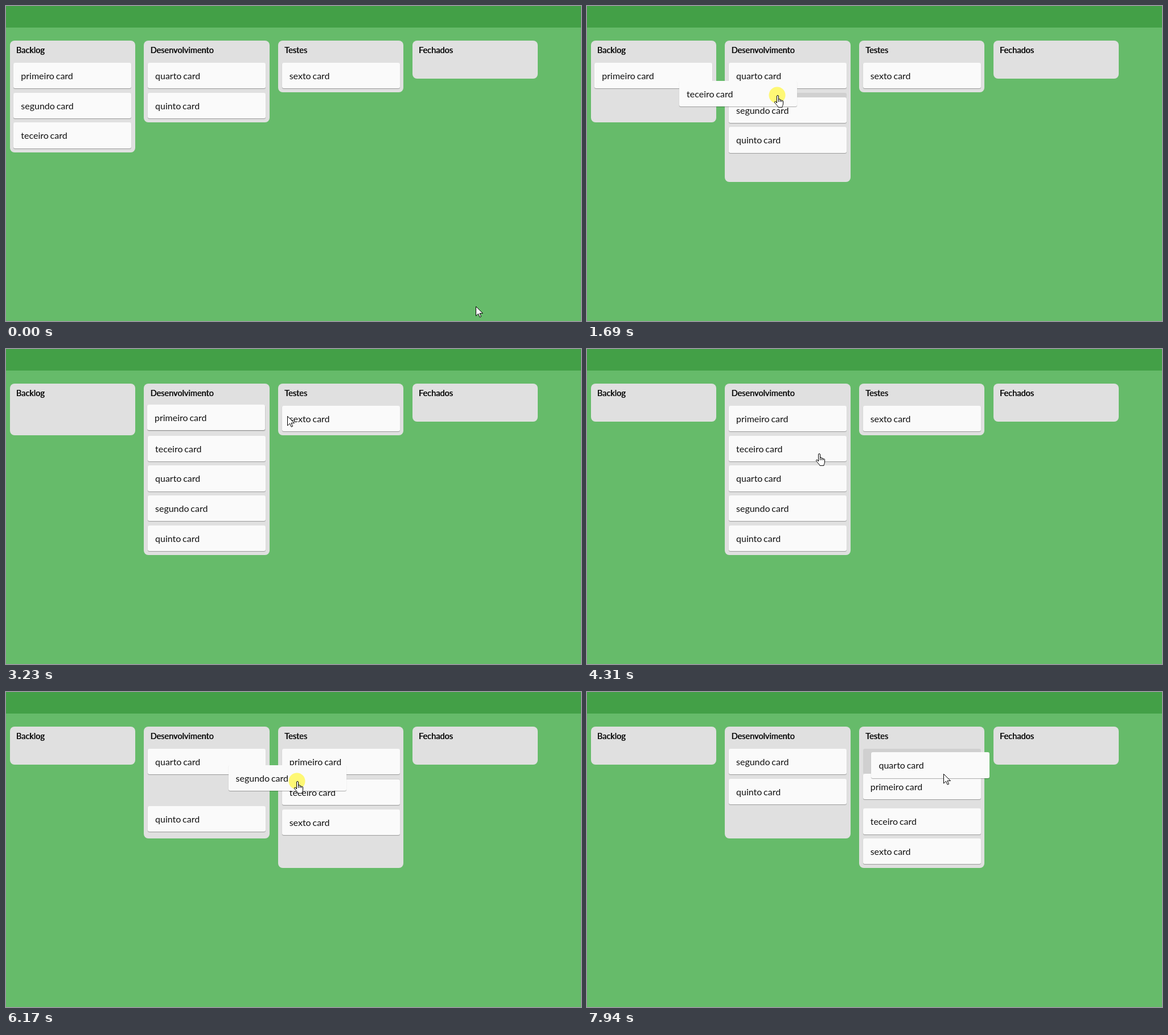
An HTML page that plays this animation: 1010x555 px, repeating every 8 s.

```html
<!DOCTYPE html>
<html lang="pt">
<head>
<meta charset="utf-8">
<title>Quadro kanban</title>
<style>
html, body { margin: 0; width: 100%; height: 100%; overflow: hidden; background: #66bb6a; }
body { position: relative; font-family: Lato, sans-serif; color: #111; }
header { height: 38px; background: #43a047; }
.column, .card, #slot, #cursor { position: absolute; box-sizing: border-box; }
.column {
  top: 61.4px; width: 220.3px; padding-left: 11px; border-radius: 8px; background: #e0e0e0;
  font-size: 14.5px; line-height: 33px; text-shadow: .6px 0 #111;
}
.card, #slot { width: 207.2px; height: 45.2px; border-radius: 3px; }
.card {
  padding-left: 13px; background: #fafafa; box-shadow: 0 1px 1px rgba(0, 0, 0, .32);
  font-size: 16px; line-height: 45px; word-spacing: -1.3px; z-index: 1;
}
#slot { background: #d0d0d0; }
#cursor { left: 0; top: 0; width: 100%; height: 100%; z-index: 3; }
#cursor path { fill: #fff; stroke: #000; stroke-linejoin: round; }
</style>
</head>
<body>
<header></header>
<svg id="cursor">
  <g id="pointer">
    <circle id="press" r="14.5" fill="rgb(255,246,60)" fill-opacity=".7"/>
    <path id="arrow" d="M.5.5V17l4-3.8 2.7 6 2.4-1-2.6-5.8h5.5z"/>
    <path id="hand" transform="translate(-6 0)" d="M5.5 14V2a1.5 1.5 0 0 1 3 0v6a1.4 1.2 0 0 1 2.8.3v1
      a1.4 1.2 0 0 1 2.7.4v.6a1.3 1.2 0 0 1 2.5.6v4c0 3-1.5 4-1.5 6.5H8c-1-2.5-4-5-6.3-8.2
      c-1-1.6 1-2.6 2.2-1.5zM8.5 8v4M11.3 9v3M14 10v2"/>
  </g>
</svg>
<script>
const LOOP = 8000, TICK = 1000 / 13, SLIDE = 230;
const COL_W = 220.3, CARD_W = 207.2, CARD_H = 45.2, PITCH = 52.7, TOP = 100;
const titles = ['Backlog', 'Desenvolvimento', 'Testes', 'Fechados'];
const board = [['primeiro', 'segundo', 'teceiro'], ['quarto', 'quinto'], ['sexto'], []];

// grip: pointer within the card; via and to: card positions on the way and at release
const drags = [
  { name: 'segundo', grab: 590, drop: 920, grip: [150, 25], to: [200, 128] },
  { name: 'teceiro', grab: 1320, drop: 1940, grip: [172, 25], via: [1692, 162, 132], to: [243, 84] },
  { name: 'primeiro', grab: 2500, drop: 3050, grip: [185, 26], via: [2769, 70, 100], to: [240, 80], rest: [3400, 590, 136] },
  { name: 'teceiro', grab: 4330, drop: 4740, grip: [158, 31], to: [500, 104] },
  { name: 'primeiro', grab: 5050, drop: 5640, grip: [89, 41], via: [5308, 467, 119], to: [507, 101] },
  { name: 'segundo', grab: 5960, drop: 6290, grip: [120, 28], to: [490, 112] },
  { name: 'segundo', grab: 6600, drop: 6940, grip: [112, 28], via: [6846, 256, 149], to: [249, 152] },
  { name: 'quarto', grab: 7280, drop: 7880, grip: [125, 37], via: [7570, 440, 123], to: [501, 107] }
];

const $ = id => document.getElementById(id);
const colX = col => 6.7 + 235.7 * col;
const slotX = col => colX(col) + 6.6;
const slotY = row => TOP + PITCH * row;
const mix = (a, b, p) => a + (b - a) * p;
const ease = u => { u = Math.min(1, Math.max(0, u)); return u * u * (3 - 2 * u); };
const slideY = (spot, t) => mix(spot.from, spot.to, ease((t - spot.time) / SLIDE));

const path = [[-40, 825, 529]];
function pointerAt(t) {
  const i = path.findIndex(p => p[0] > t);
  if (i < 0) return path.at(-1).slice(1);
  const [t0, x0, y0] = path[i - 1], [t1, x1, y1] = path[i];
  const p = (t - t0) / (t1 - t0);
  return [mix(x0, x1, p), mix(y0, y1, p)];
}

// Each card keeps the history of the spots it slides to
const tracks = {};
board.forEach((list, col) => list.forEach((name, row) =>
  tracks[name] = [{ time: -LOOP, col, row, from: slotY(row), to: slotY(row) }]));
const spotAt = (name, t) => tracks[name].findLast(s => s.time <= t);

function move(name, col, row, time) {
  board.forEach(list => list.includes(name) && list.splice(list.indexOf(name), 1));
  if (col < 0) tracks[name].push({ time, col, row, from: TOP, to: TOP });
  else board[col].splice(row, 0, name);
  board.forEach((list, c) => list.forEach((other, r) => {
    const last = tracks[other].at(-1), to = slotY(r);
    if (other === name) tracks[other].push({ time, col: c, row: r, from: to, to });
    else if (to !== last.to) tracks[other].push({ time, col: c, row: r, from: slideY(last, time), to });
  }));
}

// A dragged card takes the column under its centre and the row under the pointer
function carry(d, t) {
  const [x, y] = pointerAt(t), now = tracks[d.name].at(-1);
  const centre = x - d.grip[0] + CARD_W / 2;
  const col = titles.findIndex((_, i) => centre >= colX(i) && centre < colX(i) + COL_W);
  const room = col < 0 ? 0 : board[col].filter(name => name !== d.name).length;
  const row = Math.min(room, Math.floor((y - TOP + 2) / PITCH));
  if (col !== now.col || row !== now.row) move(d.name, col, row, t);
}

for (const d of drags) {
  const [idle, ...from] = path.at(-1);
  const grip = ([x, y]) => [x + d.grip[0], y + d.grip[1]];
  d.home = tracks[d.name].at(-1);
  const hold = grip([slotX(d.home.col), d.home.to]);
  path.push([Math.max(idle + 80, d.grab - 540), ...from], [d.grab - 60, ...hold], [d.grab, ...hold]);
  if (d.via) path.push([d.via[0], ...grip(d.via.slice(1))]);
  path.push([d.drop, ...grip(d.to)]);
  if (d.rest) path.push([d.drop + 60, ...grip(d.to)], d.rest);
  for (let t = d.grab; t < d.drop; t += 4) carry(d, t);
}

function add(className, text) {
  const el = document.createElement('div');
  el.className = className;
  el.textContent = text;
  document.body.append(el);
  return el;
}
function place(el, x, y) {
  el.style.left = x + 'px';
  el.style.top = y + 'px';
}
const show = (el, on) => el.style.display = on ? '' : 'none';

const columns = titles.map((title, i) => {
  const el = add('column', title);
  el.style.left = colX(i) + 'px';
  return el;
});
const slot = add('', '');
slot.id = 'slot';
const cards = {};
for (const name in tracks) cards[name] = add('card', name + ' card');

function render(t) {
  const drag = drags.find(d => t >= d.grab && t < d.drop + SLIDE);
  const held = drag && t < drag.drop;
  const [px, py] = pointerAt(t);
  const counts = titles.map(() => 0);
  let over = false;

  for (const name in cards) {
    const spot = spotAt(name, t), active = drag && drag.name === name;
    let x = slotX(spot.col), y = slideY(spot, t);
    counts[spot.col]++;
    if (active) {
      const [hx, hy] = pointerAt(Math.min(t, drag.drop));
      const back = ease((t - drag.drop) / SLIDE);
      place(slot, x, spot.to);
      show(slot, spot.col >= 0);
      x = mix(hx - drag.grip[0], x, back);
      y = mix(hy - drag.grip[1], spot.to, back);
      if (drag.home.col !== spot.col) counts[drag.home.col]++;
    }
    cards[name].style.zIndex = active ? 2 : 1;
    place(cards[name], x, y);
    over = over || (px >= x && px < x + CARD_W && py >= y && py < y + CARD_H);
  }
  if (!drag) show(slot, false);

  columns.forEach((el, i) => el.style.height = Math.max(66.6, 38.2 + PITCH * counts[i]) + 'px');
  const hand = held || (!drag && over);
  $('pointer').setAttribute('transform', `translate(${Math.round(px)} ${Math.round(py)})`);
  show($('press'), held);
  show($('hand'), hand);
  show($('arrow'), !hand);
}

const begin = performance.now();
function frame() {
  const t = Math.max(0, performance.now() - begin) % LOOP;
  render(Math.floor((t + 10) / TICK) * TICK);
  requestAnimationFrame(frame);
}
frame();
</script>
</body>
</html>
```
